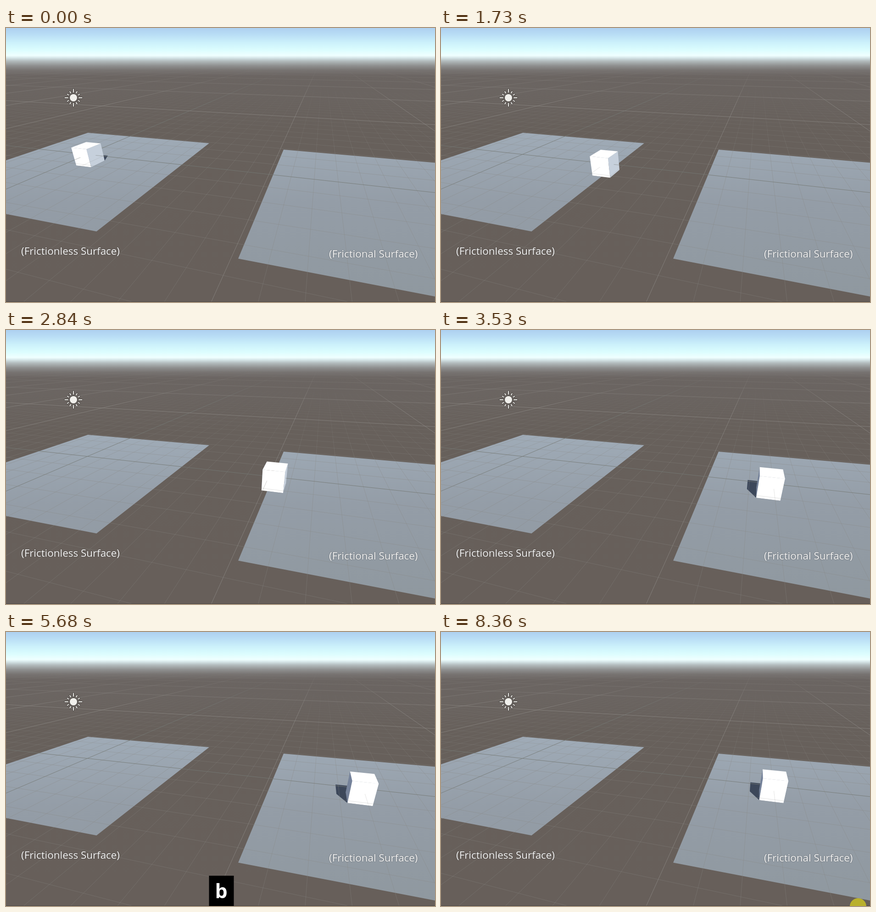
These frames come from a looping animation (935x597 px, 8430 ms). An HTML page with a canvas:

```html
<!DOCTYPE html>
<html lang="en">
<head>
<meta charset="utf-8">
<title>Friction demo</title>
<style>
html, body { margin: 0; width: 100%; height: 100%; overflow: hidden; background: #68615c; }
canvas { display: block; }
</style>
</head>
<body>
<canvas id="stage" width="935" height="597"></canvas>
<script>
const W = 935, H = 597, LOOP = 8430;
const ctx = document.getElementById('stage').getContext('2d');
const clamp = x => Math.max(0, Math.min(1, x));

// Perspective: u runs right, v toward the viewer, h is height above the slabs.
function project(u, v, h = 0) {
  const a = -.01654 * u, b = -.0761 * v, c = -.0283 * h, d = 1 + a + b + c;
  return [(177.5 - 1818.6 * a + 692 * b + 495 * c) / d,
          (275.4 + 56 * (a + b) + 1500 * c) / d];
}

function trace(g, points) {
  points.forEach(([x, y], i) => i ? g.lineTo(x, y) : g.moveTo(x, y));
  g.closePath();
}
function fillShape(g, color, points) {
  g.fillStyle = color;
  g.beginPath();
  trace(g, points);
  g.fill();
}
function gradient(g, y0, y1, stops) {
  const fill = g.createLinearGradient(0, y0, 0, y1);
  stops.forEach(([y, color]) => fill.addColorStop((y - y0) / (y1 - y0), color));
  return fill;
}
function layer(draw) {
  const c = document.createElement('canvas');
  c.width = W;
  c.height = H;
  draw(c.getContext('2d'));
  return c;
}

const slabs = [-3.36, 10.19].map(u =>
  [[u, -2.87], [u + 9, -2.87], [u + 9, 4.47], [u, 4.47]].map(p => project(...p)));

const scenery = layer(g => {
  g.fillStyle = gradient(g, 0, H, [
    [0, '#add0f0'], [14, '#b9ddf5'], [32, '#ccf1fb'], [48, '#dcfdfe'], [60, '#efffff'],
    [65, '#d6e6e8'], [72, '#b2bbbd'], [82, '#8f9090'], [92, '#777371'], [104, '#6b6562'],
    [220, '#67605b'], [H, '#675f5a']]);
  g.fillRect(0, 0, W, H);
  const slabFill = gradient(g, 220, H, [[220, '#a0acb8'], [380, '#949da7'], [H, '#8f989f']]);
  slabs.forEach(s => fillShape(g, slabFill, s));
});

const grid = layer(g => {
  const fade = (y0, y1, rgb, alpha) =>
    gradient(g, y0, y1, [[y0, `rgba(${rgb},0)`], [y1, `rgba(${rgb},${alpha})`]]);
  const fine = fade(105, 300, '135,134,130', .38);
  const major = fade(82, 170, '142,139,135', .7);
  const axis = fade(82, 170, '116,120,116', .85);
  const line = (p, q, n) => {
    g.strokeStyle = n === 0 ? axis : n % 10 ? fine : major;
    g.beginPath();
    g.moveTo(...p);
    g.lineTo(...q);
    g.stroke();
  };
  g.lineWidth = 1;
  for (let u = -100; u <= 100; u++) {
    if (u % 10 && (u < -30 || u > 40)) continue;
    const near = (.8 - .01654 * u) / .0761;
    line(project(u, -300), project(u, near), u);
  }
  for (let v = -70; v <= 10; v++) {
    if (v % 10 && v < -25) continue;
    const right = (.8 - .0761 * v) / .01654;
    line(project(-400, v), project(right, v), v);
  }
});

const overlay = layer(g => {
  g.save();
  g.translate(147, 152);
  g.lineCap = 'round';
  for (const [color, extra] of [['#45413e', 2], ['#f1f0ec', 0]]) {
    g.strokeStyle = g.fillStyle = color;
    g.lineWidth = 2 + extra;
    for (let i = 0; i < 12; i++) {
      const a = i * Math.PI / 6, end = i % 3 ? 15.5 : 18.5;
      g.beginPath();
      g.moveTo(12 * Math.cos(a), 12 * Math.sin(a));
      g.lineTo(end * Math.cos(a), end * Math.sin(a));
      g.stroke();
    }
    g.beginPath();
    g.arc(0, 0, 8 + extra / 2, 0, 7);
    g.fill();
  }
  g.restore();
  g.font = '22.4px "Open Sans", "Noto Sans", sans-serif';
  g.fillStyle = '#f4f4f4';
  g.shadowColor = 'rgba(40,40,40,.6)';
  g.shadowBlur = 2;
  g.fillText('(Frictionless Surface)', 33, 494);
  g.fillText('(Frictional Surface)', 704, 500);
  g.shadowBlur = 0;
  g.fillStyle = '#4b4744';
  g.fillRect(0, H - 1, W, 1);
});

const presses = [[470, 'f'], [4980, 'b'], [5950, 'b'], [7150, 'b']];
const SPEED = .0043, PUSH = 413, ROUGH = 2794, STOP = 4580;

// A short push, a free glide, then steady braking on the rough slab; later pushes nudge it back.
function cubePosition(t) {
  const p = Math.max(0, Math.min(t, ROUGH) - 470);
  let u = .7 + SPEED * (p < PUSH ? p * p / (2 * PUSH) : p - PUSH / 2);
  if (t > ROUGH) {
    const span = STOP - ROUGH, left = 1 - clamp((t - ROUGH) / span);
    u += SPEED * span / 2 * (1 - left * left);
  }
  for (const [start] of presses.slice(1)) {
    const k = clamp((t - start) / 840);
    u -= .41 * (k < .5 ? 2 * k * k : 1 - 2 * (1 - k) ** 2);
  }
  return u;
}

function drawCube(u) {
  const r = u + .88, back = .43, front = 1.15, du = -.37, dv = -.53;
  const side = (x, h) =>
    [[x, back, 0], [x, back, h], [x, front, h], [x, front, 0]].map(p => project(...p));
  const face = h =>
    [[u, front, 0], [u, front, h], [r, front, h], [r, front, 0]].map(p => project(...p));

  ctx.save();
  ctx.beginPath();
  slabs.forEach(s => trace(ctx, s));
  ctx.clip();
  fillShape(ctx, '#3c475a', [
    [u, front], [u + du, front + dv], [u + du, back + dv],
    [r + du, back + dv], [r, back], [r, front]].map(p => project(...p)));
  ctx.restore();
  ctx.drawImage(grid, 0, 0);

  fillShape(ctx, '#75829a', side(u, 1));
  fillShape(ctx, '#c6d0dc', side(r, 1));
  fillShape(ctx, '#fff', [[u, back, 1], [r, back, 1], [r, front, 1], [u, front, 1]].map(p => project(...p)));
  fillShape(ctx, '#fff', face(1));

  // The grid floats at mid height, so it crosses the lower half of the cube.
  ctx.save();
  ctx.beginPath();
  trace(ctx, face(.5));
  const lower = side(r, .5);
  if (lower[0][0] > lower[3][0]) trace(ctx, lower.reverse());
  ctx.clip('nonzero');
  ctx.globalAlpha = .6;
  ctx.drawImage(grid, 0, 0);
  ctx.restore();
}

function drawKey(t) {
  const press = presses.filter(([start]) => t >= start).pop();
  if (!press) return;
  ctx.globalAlpha = 1 - clamp((t - press[0] - 970) / 250);
  ctx.fillStyle = '#000';
  ctx.fillRect(442.5, 531, 54, 66);
  ctx.fillStyle = '#fff';
  ctx.font = 'bold 43px "Open Sans", "Noto Sans", sans-serif';
  ctx.textAlign = 'center';
  ctx.fillText(press[1], 469, 580);
  ctx.globalAlpha = 1;
}

function render(now) {
  const raw = now % LOOP;
  const t = raw < 470 ? 0 : 470 + Math.floor((raw - 470) / 69.2) * 69.4;
  ctx.drawImage(scenery, 0, 0);
  drawCube(cubePosition(t));
  ctx.drawImage(overlay, 0, 0);
  drawKey(t);
  if (t > 8320) {
    ctx.fillStyle = '#b9b02c';
    ctx.beginPath();
    ctx.arc(909, 598, 18, 0, 7);
    ctx.fill();
  }
}

const began = performance.now();
function tick() {
  render(performance.now() - began);
  requestAnimationFrame(tick);
}
tick();
</script>
</body>
</html>
```
